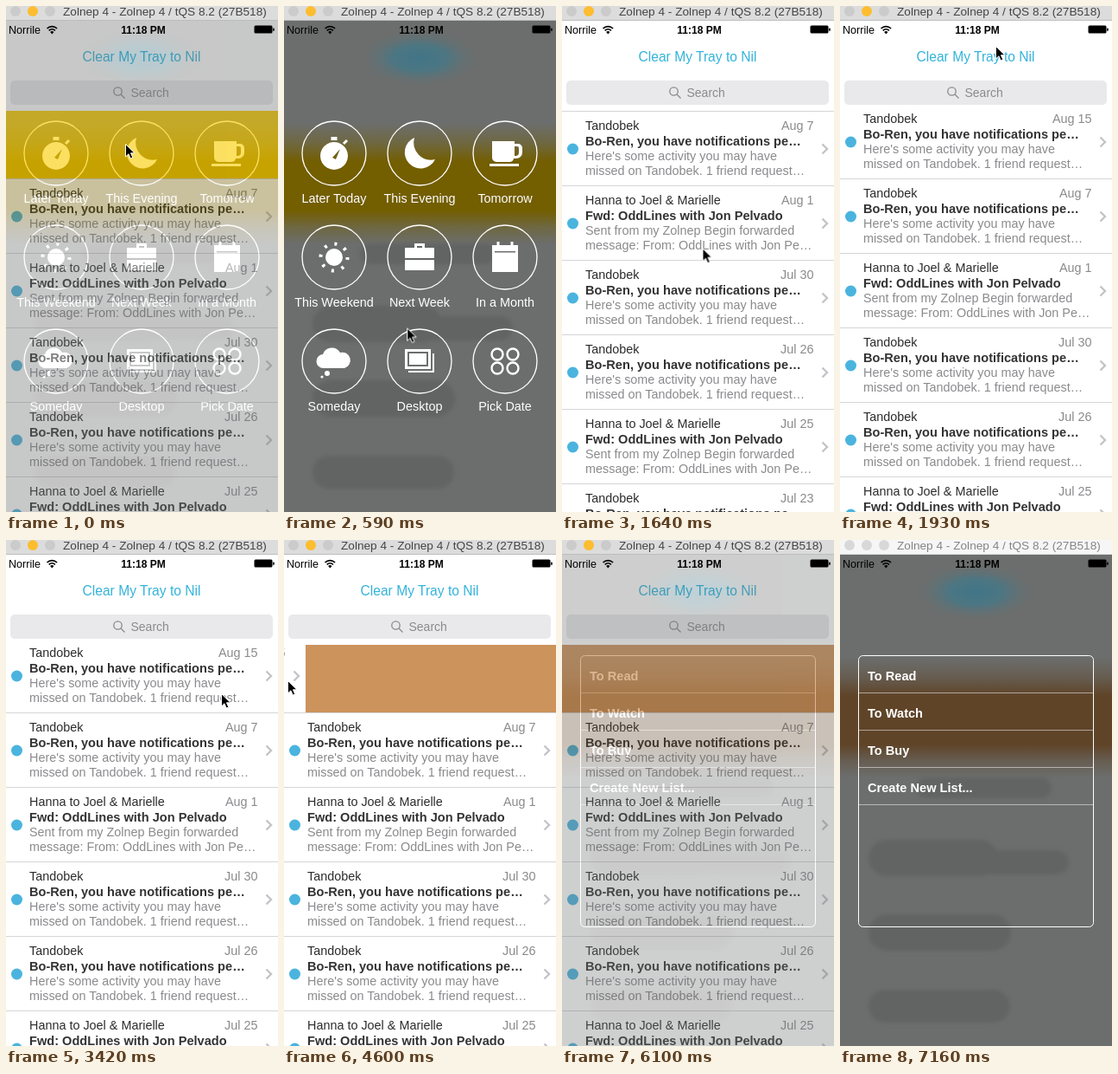
Animation of 315x584 px, one loop 7260 ms. Source, as an HTML page:

```html
<!DOCTYPE html>
<html lang="en">
<head>
<meta charset="utf-8">
<title>Mail swipe</title>
<style>
html, body { margin: 0; width: 100%; height: 100%; overflow: hidden; background: #fff; }
svg { display: block; width: 315px; height: 584px; font: 14.4px "Liberation Sans", Arial, sans-serif; }
.bold { font-weight: bold; font-size: 14.6px; }
.soft { fill: #8a8a8d; }
.mid { text-anchor: middle; }
.end { text-anchor: end; }
.white { fill: #fff; }
.line { fill: none; stroke: #fff; stroke-width: 1.3; }

#list, #slot, #mail, #later, #lists, #pointer, #inactive { animation: 7260ms step-end infinite; }
#list { animation-name: collapse; }
#slot { animation-name: tint; }
#mail { animation-name: swipe; }
#later { animation-name: later; }
#lists { animation-name: lists; }
#pointer { animation-name: point; }
#inactive { animation-name: inactive; }

@keyframes collapse {
  0% { transform: translateY(0); }
  18.45% { transform: translateY(-12px); }
  20.52% { transform: translateY(-52px); }
  22.58% { transform: translateY(-78px); }
  24.51% { transform: translateY(-86px); }
  26.58%, 100% { transform: translateY(0); }
}
@keyframes tint {
  0% { fill: #facd00; }
  49.03% { fill: #e2e2e2; }
  51.1% { fill: #facd00; }
  57.29%, 100% { fill: #cc935c; }
}
@keyframes swipe {
  0% { transform: translateX(-315px); }
  26.58% { transform: translateX(0); }
  47.1% { transform: translateX(0); animation-timing-function: steps(6); }
  59.36% { transform: translateX(-286px); }
  61.43% { transform: translateX(-288px); }
  63.36% { transform: translateX(-290px); }
  77.82% { transform: translateX(-303px); }
  79.89%, 100% { transform: translateX(-315px); }
}
@keyframes later {
  0% { opacity: .38; }
  2.06% { opacity: .72; }
  4.13% { opacity: .93; }
  6.19% { opacity: 1; }
  18.45%, 100% { opacity: 0; }
}
@keyframes lists {
  0% { opacity: 0; }
  81.95% { opacity: .06; }
  84.02% { opacity: .33; }
  86.08% { opacity: .72; }
  88.15%, 100% { opacity: 1; }
}
@keyframes point {
  0% { transform: translate(138px, 159px); animation-timing-function: steps(5); }
  10.19% { transform: translate(145px, 513px); }
  18.45% { transform: translate(145px, 513px); animation-timing-function: steps(4); }
  26.58% { transform: translate(180px, 46px); }
  28.65% { transform: translate(180px, 46px); animation-timing-function: steps(6); }
  40.9% { transform: translate(304px, 178px); }
  45.04% { transform: translate(279px, 178px); }
  47.1% { transform: translate(249px, 177px); animation-timing-function: steps(6); }
  59.36% { transform: translate(8px, 163px); }
  61.43% { transform: translate(6px, 162px); }
  63.36% { transform: translate(4px, 162px); }
  77.82%, 100% { transform: translate(-40px, 162px); }
}
@keyframes inactive {
  0% { opacity: 0; }
  98.62%, 100% { opacity: 1; }
}
</style>
</head>
<body>
<svg id="stage" viewBox="0 0 315 584"></svg>
<script>
const text = (x, y, content, cls = '', attrs = '') =>
  `<text x="${x}" y="${y}" class="${cls}" ${attrs}>${content}</text>`;
const rect = (x, y, w, h, attrs = '') =>
  `<rect x="${x}" y="${y}" width="${w}" height="${h}" ${attrs}/>`;
const circle = (x, y, r, attrs = '') => `<circle cx="${x}" cy="${y}" r="${r}" ${attrs}/>`;
const path = (d, attrs = '') => `<path d="${d}" ${attrs}/>`;
const solid = d => path(d, 'fill="#fff" fill-rule="evenodd"');
const stroke = (d, width = 2) => path(d, `fill="none" stroke="#fff" stroke-width="${width}"`);

const notice = ['Tandobek', 'Bo-Ren, you have notifications pe…',
  "Here's some activity you may have", 'missed on Tandobek. 1 friend request…'];
const forward = ['Hanna to Joel &amp; Marielle', 'Fwd: OddLines with Jon Pelvado',
  'Sent from my Zolnep Begin forwarded', 'message: From: OddLines with Jon Pe…'];
const mails = [['Aug 15', notice], ['Aug 7', notice], ['Aug 1', forward], ['Jul 30', notice],
  ['Jul 26', notice], ['Jul 25', forward], ['Jul 23', notice]];

// Each row carries the divider along its top edge.
function mailRow([date, [sender, subject, body1, body2]], i) {
  return `<g transform="translate(0 ${113 + 86 * i})"><g ${i ? '' : 'id="mail"'}>
    ${rect(0, 0, 315, 1, 'fill="#d6d6d9"')}
    ${rect(0, 1, 315, 85, 'fill="#fff"')}
    ${circle(12.5, 44, 6.5, 'fill="#4ab4de"')}
    ${text(27, 22, sender, '', 'fill="#2b2b2b"')}
    ${text(291.5, 22, date, 'soft end')}
    ${text(27, 39.5, subject, 'bold', 'fill="#333"')}
    ${text(27, 57, body1, 'soft')}
    ${text(27, 74, body2, 'soft')}
    ${path('M301.5 38.5l5.5 5.5l-5.5 5.5', 'fill="none" stroke="#c4c4c8" stroke-width="2.4"')}
    </g></g>`;
}

// Dark blurred copy of the screen that sits behind each menu.
function backdrop(id, band) {
  const stop = (y, alpha) =>
    `<stop offset="${(y - 135) / 140}" stop-color="${band}" stop-opacity="${alpha}"/>`;
  const blob = (x, y, w, h) => rect(x, y, w, h, `rx="${h / 2}"`);
  return `<linearGradient id="${id}" x2="0" y2="1">
      ${stop(135, 0)}${stop(158, .4)}${stop(180, 1)}${stop(236, 1)}${stop(255, .4)}${stop(275, 0)}
    </linearGradient>
    ${rect(0, 17, 315, 567, 'fill="#6c6e6d"')}
    <ellipse cx="157" cy="60" rx="72" ry="34" fill="url(#glow)"/>
    <g fill="#626363" filter="url(#blur)">
      ${blob(88, 274, 157, 24)}${blob(33, 346, 150, 42)}${blob(110, 358, 155, 28)}
      ${blob(33, 432, 165, 42)}${blob(33, 519, 164, 38)}
    </g>
    ${rect(0, 135, 315, 140, `fill="url(#${id})"`)}`;
}

const snoozes = [
  ['Later Today', solid('M0-13a16 16 0 1 0 .01 0zM-2 5L7-5L2 7z') +
    solid('M-3.5-19h7v4h-7z') + stroke('M11-11l4-4', 3)],
  ['This Evening', solid('M-6-18A18.5 18.5 0 1 0 18 7A20 20 0 0 1-6-18z')],
  ['Tomorrow', solid('M-15-14h26v3h4a5 5 0 0 1 5 5v5a7 7 0 0 1-7 7h-3a5 5 0 0 1-5 4h-15' +
    'a5 5 0 0 1-5-5zM11-8v11h1a4 4 0 0 0 4-4v-5a2 2 0 0 0-2-2z') + rect(-18, 12, 34, 3, 'fill="#fff"')],
  ['This Weekend', circle(0, 0, 10, 'fill="#fff"') +
    circle(0, 0, 15.5, 'fill="none" stroke="#fff" stroke-width="4" stroke-dasharray="3 9.17"')],
  ['Next Week', solid('M-6-11v-5h12v5h11v12h-34v-12zM-3-11v-2h6v2z') + solid('M-17 3h34v12h-34z')],
  ['In a Month', solid('M-15-14h30v31h-30zM-12-7h24v1.5h-24z') + stroke('M-8-18v6M8-18v6', 3)],
  ['Someday', solid('M-12 8a8 8 0 0 1-1-16a11 11 0 0 1 20-2a9 9 0 0 1 5 18z') +
    circle(-8, 14, 3, 'fill="#fff"') + circle(-14, 18, 1.6, 'fill="#fff"')],
  ['Desktop', solid('M-17-14h30v23h-30zM-14-11v17h24v-17z') + solid('M-12-9h20v13h-20z') +
    stroke('M-13 12h29v-21')],
  ['Pick Date', [[-9, -8], [9, -8], [-9, 8], [9, 8]]
    .map(([x, y]) => circle(x, y, 6.5, 'fill="none" stroke="#fff" stroke-width="2.4"')).join('')],
];

const snooze = ([label, icon], i) =>
  `<g transform="translate(${58 + 99 * (i % 3)} ${170 + 120 * Math.floor(i / 3)})">
    ${circle(0, 0, 37, 'class="line"')}${icon}${text(0, 57, label, 'white mid')}</g>`;

const listItem = (label, i) => text(32, 161.5 + 43 * i, label, 'bold white') +
  rect(22, 176 + 43 * i, 271, 1, 'fill="#fff" opacity=".5"');

function titleBar(background, edge, ink, lights) {
  return rect(0, 0, 315, 17, `fill="${background}"`) + rect(0, 16, 315, 1, `fill="${edge}"`) +
    lights.map((color, i) => circle(11 + 20 * i, 6, 6, `fill="${color}"`)).join('') +
    text(66, 11, 'Zolnep 4 - Zolnep 4 / tQS 8.2 (27B518)', '', `fill="${ink}" font-size="13.65"`);
}

const header = rect(0, 17, 315, 104, 'fill="#fff"') +
  text(157, 64, 'Clear My Tray to Nil', 'mid', 'fill="#33b3da" font-size="15.6"') +
  rect(5, 86, 304, 28, 'rx="5" fill="#e9e9eb"') +
  `<g fill="none" stroke="#8a8a8d" stroke-width="1.3">${circle(129.5, 98.5, 4.7)}${path('M133 102l4.5 4.5')}</g>` +
  text(144.5, 105, 'Search', 'soft', 'font-size="14"');

const statusBar = text(3, 31.5, 'Norrile', '', 'font-size="12.6"') +
  path('M47.5 26a8.3 8.3 0 0 1 11.6 0M49.7 28.4a5.2 5.2 0 0 1 7.2 0',
    'fill="none" stroke="#000" stroke-width="1.7"') +
  path('M53.3 32.5l-2.2-2.4a3.2 3.2 0 0 1 4.4 0z') +
  text(159, 31.5, '11:18 PM', 'bold mid', 'style="font-size:12px"') +
  rect(287.5, 22.5, 21, 9, 'rx="1.5"') + rect(309.2, 25.5, 1.5, 3.5, 'rx=".7"');

document.getElementById('stage').innerHTML = `
  <defs>
    <filter id="blur"><feGaussianBlur stdDeviation="2.5"/></filter>
    <radialGradient id="glow">
      <stop offset="0" stop-color="#417587"/><stop offset=".45" stop-color="#4d7682"/>
      <stop offset="1" stop-color="#6c6e6d" stop-opacity="0"/>
    </radialGradient>
  </defs>
  ${rect(0, 0, 315, 584, 'fill="#fff"')}
  <g id="list">${rect(0, 113, 315, 86, 'id="slot"')}${mails.map(mailRow).join('')}</g>
  ${header}
  <g id="later">${backdrop('yellow', '#735e00')}${snoozes.map(snooze).join('')}</g>
  <g id="lists">${backdrop('brown', '#5f4428')}
    ${rect(21.5, 133.5, 272, 313, 'rx="5" class="line" style="stroke-width:1"')}
    ${['To Read', 'To Watch', 'To Buy', 'Create New List...'].map(listItem).join('')}</g>
  ${statusBar}
  ${titleBar('#dcdcdc', '#bdbdbd', '#454545', ['#cbcbcb', '#fdbd2f', '#cbcbcb'])}
  <g id="inactive">${titleBar('#f6f6f6', '#d8d8d8', '#858585', ['#d8d8d8', '#d8d8d8', '#d8d8d8'])}</g>
  <g id="pointer">${path('M.5 .5v14.5l3.4-3.2l2.3 5.2l2.6-1.1l-2.3-5.1h4.6z',
    'stroke="#fff" stroke-width="1"')}</g>`;
</script>
</body>
</html>
```
